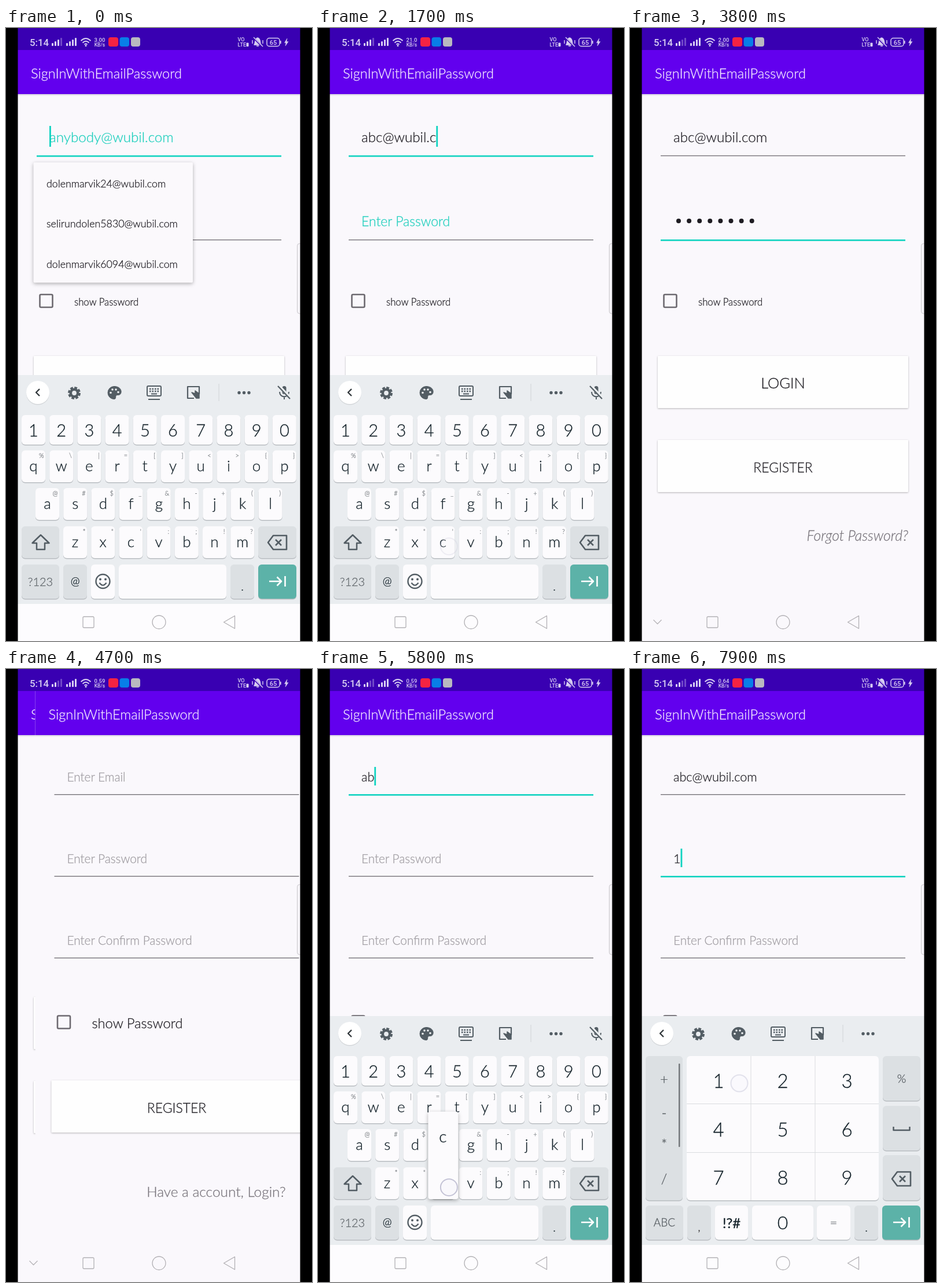
Recreate the animation shown at these times as an HTML page. Size 529 by 1058 pixels, loop 8000 ms.

```html
<!DOCTYPE html>
<html lang="en">
<head>
<meta charset="utf-8">
<title>Sign in form</title>
<style>
  html, body { margin: 0; width: 100%; height: 100%; overflow: hidden; background: #000; }
  svg { display: block; width: 529px; height: 1058px; }
  text { font-family: Lato, sans-serif; font-weight: 300; white-space: pre; stroke-width: .3px; }
  .status text { font-family: Roboto, sans-serif; font-weight: 500; stroke: none; }
  .mid { text-anchor: middle; }
  .end { text-anchor: end; }
  .italic { font-style: italic; }
  .bold { font-weight: 400; }
  .card { filter: drop-shadow(0 1.5px 1.5px rgba(0, 0, 0, .28)); }
  .menu { filter: drop-shadow(0 2px 3px rgba(0, 0, 0, .3)); }
</style>
</head>
<body>
<svg id="stage" viewBox="0 0 529 1058"></svg>
<script>
const LOOP = 8000, STEP = 100;
const TEAL = '#0fd3c0', INK = '#232127', ICON = '#535d64', PAGE = '#faf8fc';
const HINT = '#1fcfbd', PALE = '#d8cff2', KEY = '#fcfbfd', GREY = '#dce0e3', GLYPH = '#14222a';
const EMAIL = 'abc@wubil.com';

// Moments at which each letter of the address lands.
const loginTimes = [...EMAIL].map((_, i) => i < 11 ? 300 + i * 140 : 800 + i * 100);
const registerTimes = [...EMAIL].map((_, i) => (i < 3 ? 5700 : 5900) + i * 100);
const speeds = [[0, '3.00'], [900, '21.0'], [3800, '2.00'], [4700, '0.59'], [6100, '3.00'], [7400, '0.64']];

const esc = s => s.replace(/&/g, '&amp;').replace(/</g, '&lt;');
const text = (x, y, s, size, fill = INK, cls = '') =>
  `<text x="${x}" y="${y}" font-size="${size}" fill="${fill}" stroke="${fill}" class="${cls}">${esc(s)}</text>`;
const rect = (x, y, w, h, fill, r = 0, more = '') =>
  `<rect x="${x}" y="${y}" width="${w}" height="${h}" rx="${r}" fill="${fill}" ${more}/>`;
const circle = (x, y, r, fill, more = '') =>
  `<circle cx="${x}" cy="${y}" r="${r}" fill="${fill}" ${more}/>`;
const line = (d, color, w = 2, fill = 'none', more = '') =>
  `<path d="${d}" fill="${fill}" stroke="${color}" stroke-width="${w}" stroke-linejoin="round" ${more}/>`;
const group = (body, more = '') => `<g ${more}>${body}</g>`;
const move = (x, y, body) => group(body, `transform="translate(${x} ${y})"`);

const pen = document.createElement('canvas').getContext('2d');
function textWidth(s, size) {
  pen.font = `300 ${size}px Lato, sans-serif`;
  return pen.measureText(s).width;
}

/* ---------- keyboard ---------- */

const keyBox = (x, y, w, h, fill = KEY) =>
  rect(x, y + 1.5, w, h, '#b9bdc1', 6) + rect(x, y, w, h, fill, 6);

const keys = {};
function addRow(chars, left, top, h, { size = 26, drop = 8.5, marks = '' }) {
  [...chars].forEach((c, i) => {
    keys[c] = { x: left + i * 48.2, y: top, w: 41, h, size, drop, mark: marks[i], fill: KEY };
  });
}
addRow('1234567890', 27, 668, 51, { size: 29, drop: 11.5 });
addRow('qwertyuiop', 27, 729, 55, { marks: '%\\|=[]<>{}' });
addRow('asdfghjkl', 51, 794, 55, { marks: '@#$_&-+()' });
addRow('zxcvbnm', 99, 860, 55, { marks: '*"\':;!?' });
keys['@'] = { x: 99, y: 926, w: 41, h: 59, fill: GREY, size: 19, drop: 5.5 };
keys['.'] = { x: 388, y: 926, w: 41, h: 59, fill: GREY, size: 20, drop: 15 };

const drawKey = (c, k) =>
  keyBox(k.x, k.y, k.w, k.h, k.fill) +
  text(k.x + 20.5, k.y + k.h / 2 + k.drop, c, k.size, GLYPH, 'mid') +
  (k.mark ? text(k.x + 38.5, k.y + 13, k.mark, 11, '#85898d', 'end') : '');

const backspace = y => move(469, y,
  line('M-16 0 L-7 -12 H16 V12 H-7 Z', ICON, 2.6) + line('M-3 -5 L7 5 M7 -5 L-3 5', ICON, 2.6));

const enterKey = keyBox(436, 926, 66, 59, '#5cb2a8') +
  line('M455 955 H476 M468.5 947.5 L476 955 L468.5 962.5 M482.5 946 V964', '#fff', 2.6);

const gear = move(118, 630,
  circle(0, 0, 9, 'none', `stroke="${ICON}" stroke-width="4" stroke-dasharray="4.6 2.47"`) +
  circle(0, 0, 6.2, 'none', `stroke="${ICON}" stroke-width="4.6"`));
const palette = move(187, 629.5,
  line('M0 -11 C15 -11 15 5 6 4 C0 4 5 11 0 11 A11 11 0 0 1 0 -11 Z', ICON, 1, ICON) +
  [[-6, 0], [-3, -5.5], [3, -5.5], [7, -1]].map(p => circle(...p, 1.8, '#eceff1')).join(''));
const keyboardIcon = move(256, 627,
  rect(-12, -9, 24, 17, 'none', 2, `stroke="${ICON}" stroke-width="2"`) +
  line('M-8 -4 H8 M-8 0 H8', ICON, 2.4, 'none', 'stroke-dasharray="2.5 2"') +
  line('M-5 4.5 H5 M-10 14 H10', ICON, 2));
const sticker = move(324, 629,
  line('M1 10 H-10 V-10 H10 V3', ICON, 2.2) + line('M-3 0 L3 2 V-3 L10 2 V10 H5 Z', ICON, 1.5, ICON));
const micOff = move(481, 629,
  rect(-3.5, -11, 7, 14, ICON, 3.5) +
  line('M-8 -1 C-8 10 8 10 8 -1 M0 7 V12', ICON, 2) +
  line('M-9 -11 L11 10', '#eceff1', 5) + line('M-11 -11 L10 11', ICON, 2.2));

const toolbar = rect(20, 599, 489, 395, '#eaedf0') +
  circle(55, 630.5, 20, '#d3d6d9') + circle(55, 629, 20, '#fff') +
  line('M58 623 L52 629 L58 635', '#33393d', 2.4) +
  gear + palette + keyboardIcon + sticker +
  rect(367.5, 614, 1, 30, '#cfd3d6') +
  [403, 411.5, 420].map(x => circle(x, 629.5, 2.7, ICON)).join('');

const letters = toolbar + micOff +
  Object.entries(keys).map(([c, k]) => drawKey(c, k)).join('') +
  keyBox(27, 860, 65, 55, GREY) + line('M60 875 L45.5 889 H53 V900 H67 V889 H74.5 Z', ICON, 2.5) +
  keyBox(436, 860, 66, 55, GREY) + backspace(888) +
  keyBox(27, 926, 65, 59, GREY) + text(59.5, 963, '?123', 20, '#62686d', 'mid') +
  keyBox(147, 926, 41, 59) +
  circle(167.5, 955, 12, 'none', `stroke="${ICON}" stroke-width="2.4"`) +
  circle(163, 951.5, 2, ICON) + circle(172, 951.5, 2, ICON) +
  line('M161.5 957.5 Q167.5 966 173.5 957.5', ICON, 2.2) +
  keyBox(195, 926, 186, 59) + enterKey;

const smallKey = (x, y, w, h, s, size, fill = GREY) =>
  keyBox(x, y, w, h, fill) + text(x + w / 2, y + h / 2 + size * .35, s, size, '#565c61', 'mid');

const numbers = toolbar +
  keyBox(27, 668, 64, 249, GREY) +
  [['+', 708], ['-', 767], ['*', 821], ['/', 880]].map(([s, y]) => text(59, y + 8, s, 24, '#565c61', 'mid')).join('') +
  rect(84, 681, 2.5, 144, '#74787c', 1) +
  keyBox(98, 668, 332, 249) +
  [208.5, 319.5].map(x => rect(x, 668, 1, 249, '#d9dcdf')).join('') +
  [750, 834].map(y => rect(98, y, 332, 1, '#d9dcdf')).join('') +
  [...'123456789'].map((c, i) =>
    text(153 + i % 3 * 111, 723 + Math.floor(i / 3) * 83.5, c, 33, GLYPH, 'mid')).join('') +
  smallKey(437, 668, 65, 77, '%', 20) +
  keyBox(437, 754, 65, 77, GREY) + line('M455.5 790 V796 H483.5 V790', ICON, 2.5) +
  keyBox(437, 839, 65, 78, GREY) + backspace(880) +
  smallKey(27, 926, 65, 59, 'ABC', 19) +
  keyBox(99, 926, 41, 59, GREY) + text(119.5, 970, ',', 20, '#333', 'mid') +
  keyBox(147, 926, 57, 59) + text(175.5, 965, '!?#', 24, GLYPH, 'mid bold') +
  keyBox(211, 926, 106, 59) + text(264, 967, '0', 32, GLYPH, 'mid') +
  smallKey(323, 926, 58, 59, '=', 22, KEY) +
  drawKey('.', keys['.']) + enterKey;

/* ---------- pages ---------- */

const appBar = rect(20, 38, 489, 1020, PAGE) +
  rect(20, 114, 489, 3, '#ebe7f1') + rect(20, 114, 489, 1, '#cdc5dd') +
  rect(20, 38, 489, 76, '#6200ee') + text(43, 87, 'SignInWithEmailPassword', 23.6, '#f3ecff');

const underline = (y, focus) =>
  focus ? rect(53, y, 423, 2.6, TEAL) : rect(53, y, 423, 1.4, '#777479');

const cursor = (x, y, h) => rect(x, y, 2.8, h, TEAL);

const checkbox = (y, size) =>
  rect(58.5, y, 22, 22, 'none', 2, 'stroke="#6d6a70" stroke-width="2.6"') +
  text(118, y + 12 + size * .42, 'show Password', size);

const button = (y, label, size) =>
  rect(48, y, 433, 90, '#fefefe', 1, 'class="card"') + text(264.5, y + 55.5, label, size, INK, 'mid');

const menu = rect(47.5, 232, 275.5, 207.5, '#fbf9fc', 2, 'class="menu"') +
  ['dolenmarvik24', 'selirundolen5830', 'dolenmarvik6094']
    .map((s, i) => text(70, 275 + i * 69.3, s + '@wubil.com', 17.8)).join('');

const typed = (times, t) => EMAIL.slice(0, times.filter(at => at <= t).length);

function loginPage(t) {
  const value = typed(loginTimes, t), done = t >= 3800, inPassword = t >= 2300;
  let out = appBar + underline(219.8, !inPassword) + underline(365, inPassword);
  out += value ? text(75, 197, value, 24.2) : text(75, 197, 'anybody@wubil.com', 24.2, HINT);
  if (!inPassword) out += cursor(75 + textWidth(value, 24.2), 169, 36);
  if (done) for (let i = 0; i < 8; i++) out += circle(84 + i * 18.1, 333, 4, '#1e1c22');
  else out += text(75, 342, 'Enter Password', 23, HINT);
  if (inPassword && !done) out += cursor(75, 314, 36);
  out += checkbox(460, 16.8) + button(566, 'LOGIN', 25.5) + button(711, 'REGISTER', 22.9) +
    text(481, 885, 'Forgot Password?', 24.8, '#7b777e', 'end italic');
  return out + (value ? '' : menu);
}

function registerPage(t) {
  const focus = t < 5300 ? -1 : t < 7400 ? 0 : 1;
  const values = [typed(registerTimes, t), t >= 7900 ? '1' : '', ''];
  const hints = ['Enter Email', 'Enter Password', 'Enter Confirm Password'];
  return appBar + hints.map((hint, i) => {
    const y = i * 141, s = values[i];
    return underline(216 + y, focus === i) +
      text(75, 194 + y, s || hint, s ? 21.6 : 20.8, s ? INK : '#a09da2') +
      (focus === i ? cursor(75 + textWidth(s, 21.6), 169 + y, 32) : '');
  }).join('') + checkbox(598.5, 23.7) + button(710, 'REGISTER', 22.9) +
    text(453, 911, 'Have a account, Login?', 24.4, '#7b777e', 'end');
}

/* ---------- system bars ---------- */

const signal = (x, lit) => [5, 8, 11, 14].map((h, i) =>
  rect(x + i * 5, 31 - h, 3, h, PALE, 1, i < lit ? '' : 'opacity=".35"')).join('');

function statusBar(t) {
  const speed = speeds.filter(s => s[0] <= t).pop()[1];
  return group(rect(20, 0, 489, 38, '#3900b2') +
    text(41, 31, '5:14', 16.8, PALE) + signal(79, t >= 3800 ? 2 : 3) + signal(104, 4) +
    line('M129.5 22 Q138 14 146.5 22 M132.5 25.5 Q138 20 143.5 25.5 M135.5 28.5 Q138 26 140.5 28.5', PALE, 2) +
    circle(138, 30.5, 1.5, PALE) +
    text(162, 23.5, speed, 9.5, PALE, 'mid') + text(162, 32, 'KB/s', 8.5, PALE, 'mid') +
    rect(177, 16, 17, 16, '#f52343', 4) + rect(196.5, 16, 16.5, 16, '#087ee8', 4) + rect(216, 16, 16, 16, '#b9b9c0', 4) +
    text(400.5, 23, 'VO', 9, PALE) + text(400.5, 32, 'LTE', 9, PALE) + rect(415.5, 25.5, 4, 6.5, PALE, 1) +
    line('M429 29 C432 26 429 18 435 17 C441 18 438 26 441 29 Z M433 31 H437', PALE, 1.6, PALE) +
    line('M426 21 V27 M444 21 V27', PALE, 1.4) + line('M427 16 L443 32', '#3900b2', 3) + line('M428 16 L444 32', PALE, 1.4) +
    rect(451, 17.5, 22, 14, 'none', 4, `stroke="${PALE}" stroke-width="1.5"`) + rect(474, 22, 1.6, 5, PALE) +
    text(462, 28.5, '65', 11, PALE, 'mid') +
    line('M486 18 L481.5 25.5 H484 L483 31 L488 23.5 H485 Z', PALE, .5, PALE), 'class="status"');
}

const thin = 'stroke="#b3b1b5" stroke-width="1.3"';
const navBar = open => rect(20, 994, 489, 64, open ? '#fdfcfe' : PAGE) +
  (open ? '' : line('M40.5 1021.5 L47.5 1028.5 L54.5 1021.5', '#b3b1b5', 1.3)) +
  rect(133, 1016, 19, 19, 'none', 2, thin) + circle(264.5, 1025.5, 11.5, 'none', thin) +
  line('M376.5 1025.5 L395.5 1014.5 V1036.5 Z', '#b3b1b5', 1.3);

const frameEdges = rect(503.5, 372, 12, 121, '#f6f4f8', 4, 'stroke="#c9c7cc"') +
  rect(0, 0, 20.5, 1058, '#000') + rect(508.5, 0, 20.5, 1058, '#000');

/* ---------- touches ---------- */

const dot = (x, y, strength = 1) => circle(x, y, 14.5, '#f8f7fc',
  `fill-opacity="${strength * .85}" stroke="#c4c3d6" stroke-opacity="${strength}" stroke-width="2"`);

function bubble(c) {
  const k = keys[c], cx = k.x + 20.5;
  return rect(k.x - 5, k.y - 96, 52, 96 + k.h, k.fill === GREY ? '#d6d8da' : KEY, 4, 'class="menu"') +
    text(cx, k.y - 43, c, 28, GLYPH, 'mid') +
    (c === '.' ? text(cx + 13, k.y - 28, '...', 17, '#555', 'mid') : '');
}

function keyTouch(times, t) {
  const next = times.findIndex(at => t < at && at - STEP <= t);
  const last = times.findIndex(at => at <= t && t < at + STEP);
  if (next < 0 && last < 0) return '';
  const c = EMAIL[next < 0 ? last : next], k = keys[c];
  const spot = dot(k.x + 31, k.y + k.h * .63, next < 0 ? .25 : 1);
  return next < 0 ? spot : bubble(c) + spot;
}

const taps = [
  [2200, 470, 958, 1], [4300, 270, 760, 1], [4400, 270, 760, .5],
  [5200, 190, 190, 1], [7300, 470, 958, 1], [7800, 189, 715, 1], [7900, 189, 715, .45]
];
const tapAt = t => taps.filter(p => p[0] === t).map(([, ...p]) => dot(...p)).join('');

/* ---------- timeline ---------- */

const easeOut = p => 1 - (1 - p) ** 2;
const span = (t, from, to) => Math.min(1, Math.max(0, (t - from) / (to - from)));

function scene(t) {
  if (t >= 2500 && t < 3800) return rect(0, 0, 529, 1058, '#000');
  const enter = easeOut(span(t, 4400, 4800));
  const rise = t < 2500 ? 1 : easeOut(span(t, 5200, 5500));
  const open = rise > 0;
  let out = '';
  if (enter < 1) out += loginPage(t);
  if (enter > 0) out += move(488 * (1 - enter), 0, registerPage(t));
  if (open) out += move(0, 395 * (1 - rise), t >= 7400 ? numbers : letters);
  return out + navBar(open) + statusBar(t) +
    keyTouch(t < 2500 ? loginTimes : registerTimes, t) + tapAt(t) + frameEdges;
}

const stage = document.getElementById('stage');
const start = performance.now();
let shown = -1;
function tick() {
  const t = Math.floor((performance.now() - start) % LOOP / STEP) * STEP;
  if (t !== shown) stage.innerHTML = scene(shown = t);
  requestAnimationFrame(tick);
}
tick();
</script>
</body>
</html>
```
